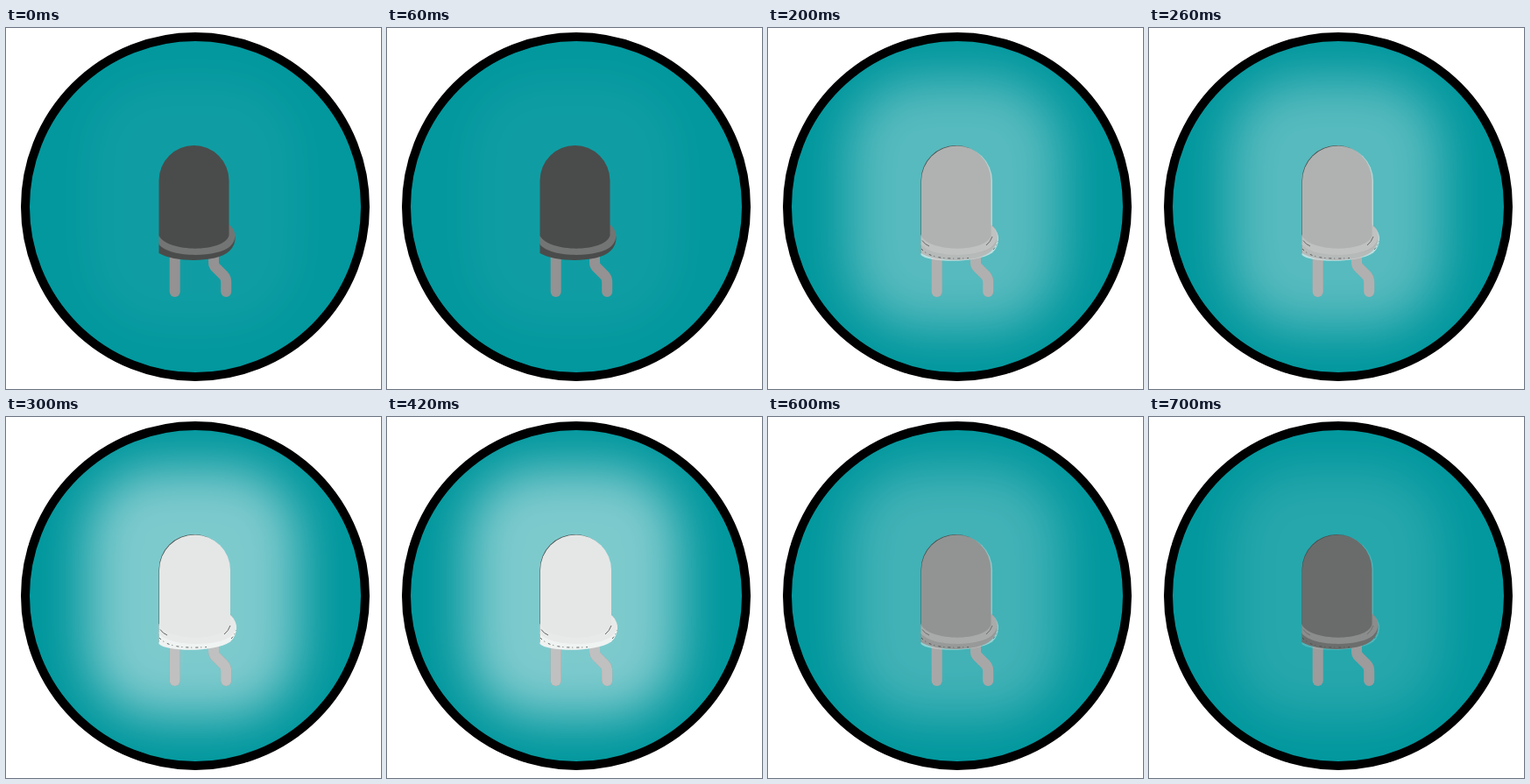
Write an HTML page that moves like this. It is 428 px wide and 412 px high and loops after 800 ms.

```html
<!DOCTYPE html>
<html lang="en">
<head>
<meta charset="utf-8">
<title>Blinking LED</title>
<style>
  html, body { margin: 0; width: 100%; height: 100%; overflow: hidden; background: #fff; }
  svg { display: block; width: 100vw; height: 100vh; }
</style>
</head>
<body>
<svg viewBox="0 0 428 412">
  <defs>
    <filter id="soft" filterUnits="userSpaceOnUse" x="-40" y="-60" width="510" height="530"
            color-interpolation-filters="sRGB">
      <feGaussianBlur stdDeviation="28"/>
    </filter>
    <clipPath id="disc"><circle cx="216" cy="204" r="190"/></clipPath>
    <g id="legs" fill="none" stroke-width="12" stroke-linecap="round" stroke-linejoin="round">
      <path d="M192.7 260V301"/>
      <path d="M237 260V268Q237 271 239.500 273.500L248.500 282.500Q251.200 285.500 251.200 290V301"/>
    </g>
  </defs>

  <circle cx="216" cy="204" r="194" fill="#02989e"/>
  <g clip-path="url(#disc)">
    <rect id="glow" x="92" y="58" width="242" height="285" rx="82" fill="#fff" filter="url(#soft)"/>
  </g>
  <circle cx="216" cy="204" r="194" fill="none" stroke="#000" stroke-width="10"/>

  <g id="unlit">
    <use href="#legs" stroke="#949293"/>
    <path fill="#4a4c4b" d="M174.500 246V257C193 268 241 268 255 254.500Q262 248 261.500 238Z"/>
    <path fill="#737574" d="M174.500 236V247C187 263 243 262 256 249Q262 243 261.500 236Q260 228 254 224Z"/>
    <path fill="#4a4c4b" d="M174.500 174A40 40 0 0 1 254.500 174V237C248 256.500 185 256.500 174.500 237Z"/>
  </g>

  <g id="lit">
    <use href="#legs" stroke="#c0c0c0"/>
    <path fill="#eff3f2" d="M174.500 246V259C183 268 238 269 256 256.500Q264 249 263 238Z"/>
    <path fill="#e8eae9" d="M174.500 236V247C187 263 243 262 257 250Q263 244 263 238Q261 229 255 225Z"/>
    <path fill="#e5e7e6" d="M175 174.500A40.500 40 0 0 1 256 174.500V237C248 256.500 185 256.500 175 237Z"/>
    <g fill="none" stroke="#555" stroke-width=".9">
      <path d="M176 242.500Q179 247 184 249M249 248Q254 244 256 238"/>
      <path stroke-dasharray="3 3 1 4" d="M175 252Q181 259 194 261.500T229 262.500M257 253Q261 249 262.500 243"/>
    </g>
  </g>
</svg>
<script>
  const STEP = 100;
  const brightness = [0, 0.4, 0.66, 1, 1, 0.775, 0.466, 0.205];
  const glow = document.getElementById("glow");
  const lit = document.getElementById("lit");

  function draw(time) {
    const level = brightness[Math.floor(time / STEP) % brightness.length];
    glow.setAttribute("opacity", 0.055 + 0.43 * level);
    lit.setAttribute("opacity", level);
  }

  const start = performance.now();
  function tick() {
    draw(performance.now() - start);
    requestAnimationFrame(tick);
  }
  tick();
</script>
</body>
</html>
```
